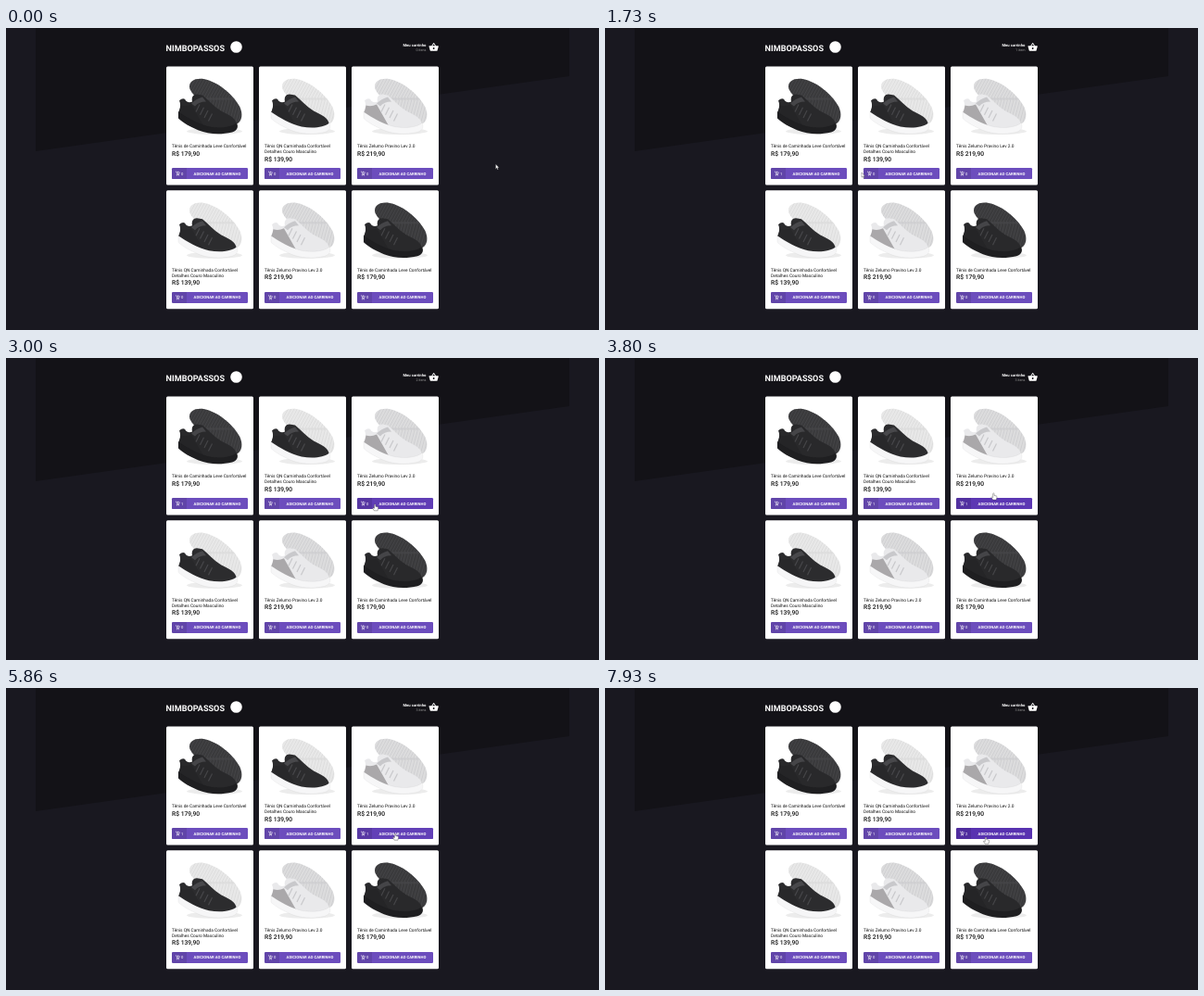
These frames come from a looping animation (640 by 326 pixels, 8 s). An HTML page:

```html
<!DOCTYPE html>
<html lang="pt-BR">
<head>
<meta charset="utf-8">
<style>
  html, body { margin: 0; height: 100%; overflow: hidden; background: #191820; }
  svg { display: block; width: 100%; height: 100%; }
  text { font-family: Roboto, sans-serif; text-rendering: geometricPrecision; }
  .bold { font-weight: 700; }
  .price { font-weight: 500; font-size: 6.7px; }
</style>
</head>
<body>
<svg id="stage" viewBox="0 0 640 326">
  <defs>
    <path id="sole" d="M25 22C25 14 35 11 46 15C60 20 72 31 79 43C83 51 82 59 76 62C66 58 60 50 50 44C40 38 26 31 25 22Z"/>
    <clipPath id="soleClip"><use href="#sole"/></clipPath>
    <path id="upper" d="M14 37C17 34 20 34 21 37Q24 40 28 38C27 33 29 30 33 30L39 31C45 36 51 43 59 48C67 52 75 55 76 63C70 69 58 69 46 66C32 63 22 57 13 50C15 46 16 41 14 37Z"/>
    <path id="midsole" d="M13 49C23 56 34 62 46 65C58 67 70 66 76 61C78 65 77 69 71 71C58 74 45 73 35 69C26 65 18 61 13 56Z"/>
    <path id="heel" d="M15.5 42Q21 44 27 41L40 64C28 60 20 55 13 50Q15 46 15.5 42Z"/>
    <g id="cart" fill="none" stroke="#fff" stroke-width=".6">
      <path d="M0 .3H.8L1.8 2.8H3.8L4.5 .9M1.8 2.8L1.2 3.7H4M2.7 0V1.7M1.9 .9H3.5"/>
      <path d="M1.2 4.6H1.8M3.4 4.6H4"/>
    </g>
  </defs>
  <path d="M32 0H608V52L32 133Z" fill="#131217"/>
  <text class="bold" x="172.6" y="25.2" font-size="9.1" fill="#fff">NIMBOPASSOS</text>
  <circle cx="248.5" cy="20.5" r="6.3" fill="#fff"/>
  <g id="basket" fill="#fff">
    <text class="bold" x="453.4" y="20.1" font-size="4.2" text-anchor="end">Meu carrinho</text>
    <text id="total" x="453.4" y="25" font-size="3.7" fill="#999" text-anchor="end"></text>
    <path transform="translate(456 15) scale(.47)" fill-rule="evenodd" d="M17.2 9L12.8 2.4Q12 1.6 11.2 2.4L6.8 9H2Q1 9 1 10.2L3.6 19.5Q4 21 5.5 21H18.5Q20 21 20.4 19.5L23 10.2Q23 9 22 9ZM9 9L12 4.6L15 9ZM12 17a2 2 0 1 1 0-4a2 2 0 1 1 0 4Z"/>
  </g>
  <g id="cards"></g>
  <path id="arrow" d="M0 0V5.2L1.2 4.1L2 5.9L2.8 5.5L2 3.8H3.6Z" fill="#fff" stroke="#333" stroke-width=".35"/>
  <path id="hand" d="M-.7.6Q0-.5.7.6V2.6L3 3.1Q3.8 3.4 3.6 4.4L3 7.2H-.8L-2.6 4.5Q-2.3 3.6-.7 4.7Z" fill="#fff" stroke="#333" stroke-width=".4"/>
</svg>
<script>
const LOOP = 8000, FADE = 180;
const $ = id => document.getElementById(id);

const black = { name: ['Tênis de Caminhada Leve Confortável'], price: '179,90',
  sole: '#3a3a3c', tread: '#4a4a4d', upper: '#29292b', heel: '#252527', mid: '#1f1f21', lace: '#454548' };
const duo = { name: ['Tênis QN Caminhada Confortável', 'Detalhes Couro Masculino'], price: '139,90',
  sole: '#e8e8e8', tread: '#d8d8d9', upper: '#2c2c2e', heel: '#28282a', mid: '#f6f6f7', lace: '#48484b' };
const white = { name: ['Tênis Zelumo Pravino Lev 2.0'], price: '219,90',
  sole: '#dcdcdd', tread: '#cbcbcd', upper: '#e9e9eb', heel: '#aaa8aa', mid: '#f6f6f7', lace: '#c8c8cb' };
const products = [black, duo, white, duo, white, black];

const range = (n, f) => Array.from({ length: n }, (_, i) => f(i)).join('');

function shoe(p) {
  const treads = range(24, i => `M${20 + i * 3.3} 4l-16 30l8 2l-8 30`);
  const laces = range(4, i => `M${36 + i * 4.5} ${41 + i * 3.3}l-4 8`);
  return `<ellipse cx="52" cy="70" rx="30" ry="3.5" fill="#ececec"/>
    <use href="#sole" fill="${p.sole}"/>
    <path d="${treads}" clip-path="url(#soleClip)" fill="none" stroke="${p.tread}" stroke-width=".7"/>
    <use href="#upper" fill="${p.upper}"/><use href="#heel" fill="${p.heel}"/>
    <path d="M27 40Q32 35 39 33L43 38Q35 38 31 43Z" fill="${p.lace}"/>
    <path d="${laces}" stroke="${p.lace}" stroke-width="1.2"/>
    <use href="#midsole" fill="${p.mid}" stroke="#0002" stroke-width=".3"/>`;
}

function card(p, i) {
  const x = 173 + i % 3 * 100, y = 41.5 + (i > 2 ? 133.8 : 0);
  const lines = p.name.map((line, n) =>
    `<text x="6" y="${87.4 + n * 6}" font-size="4.8">${line}</text>`).join('');
  return `<g transform="translate(${x} ${y})" fill="#111">
    <rect width="94" height="128" rx="1.5" fill="#fff"/>
    ${shoe(p)}${lines}
    <text class="price" x="6" y="${90.1 + p.name.length * 6}">R$ ${p.price}</text>
    <rect id="button${i}" x="6" y="109.6" width="82" height="12" rx="1.2"/>
    <path d="M22 109.6H7.2Q6 109.6 6 110.8V120.4Q6 121.6 7.2 121.6H22Z" fill="#0000001a"/>
    <use href="#cart" x="10" y="113.2"/>
    <g font-size="4.2" fill="#fff">
      <text id="count${i}" x="16.1" y="117.2"></text>
      <text class="bold" x="55" y="117.2" text-anchor="middle">ADICIONAR AO CARRINHO</text>
    </g></g>`;
}
$('cards').innerHTML = products.map(card).join('');

// Pointer stops: time, x, y
const stops = [
  [0, 528.5, 147], [60, 528.5, 147], [860, 235, 157], [1330, 232, 156],
  [1690, 277, 156], [1740, 277, 156], [2100, 321, 156], [2500, 321, 156],
  [3200, 417, 158], [3685, 416, 157], [4350, 458, 19], [4650, 459, 21],
  [5130, 451, 22.8], [5300, 450, 24], [5850, 420, 157], [6200, 420, 157],
  [6899, 434, 20], [7150, 436, 20], [7760, 411, 161], [LOOP, 411, 161]
];
const clicks = [[1250, 0], [2220, 1], [3600, 2], [6020, 2]]; // time, product

function pointer(t) {
  const i = Math.max(1, stops.findIndex(s => s[0] >= t));
  const [t0, x0, y0] = stops[i - 1], [t1, x1, y1] = stops[i];
  const u = Math.max(0, (t - t0) / (t1 - t0)), s = u * u * (3 - 2 * u);
  return [x0 + (x1 - x0) * s, y0 + (y1 - y0) * s];
}

const boxes = products.map((_, i) => [179 + i % 3 * 100, i > 2 ? 285 : 151, 82, 12]);
const basketBox = [428, 14, 39, 13];

function inside(t, [x, y, w, h]) {
  const [px, py] = pointer(t);
  return px >= x && px <= x + w && py >= y && py <= y + h;
}

// Share of the last FADE ms spent over the box
function hover(t, box) {
  let sum = 0;
  for (let k = 0; k < 20; k++) sum += inside(t - k * FADE / 20, box);
  return sum / 20;
}

const mix = (a, b, k) => `rgb(${a.map((v, i) => v + (b[i] - v) * k)})`;

function render(t) {
  const done = clicks.filter(c => c[0] <= t).map(c => c[1]);
  const total = new Set(done).size;
  $('total').textContent = total + (total === 1 ? ' item' : ' itens');
  $('basket').setAttribute('opacity', 1 - .3 * hover(t, basketBox));
  boxes.forEach((box, i) => {
    $('button' + i).setAttribute('fill', mix([108, 77, 189], [88, 50, 176], hover(t, box)));
    $('count' + i).textContent = done.filter(p => p === i).length;
  });
  const isHand = [...boxes, basketBox].some(box => inside(t - 50, box));
  const place = `translate(${pointer(t)})`;
  for (const [id, shown] of [['arrow', !isHand], ['hand', isHand]]) {
    $(id).setAttribute('transform', place);
    $(id).setAttribute('visibility', shown ? 'visible' : 'hidden');
  }
}

function frame() {
  render(performance.now() % LOOP);
  requestAnimationFrame(frame);
}
frame();
</script>
</body>
</html>
```
